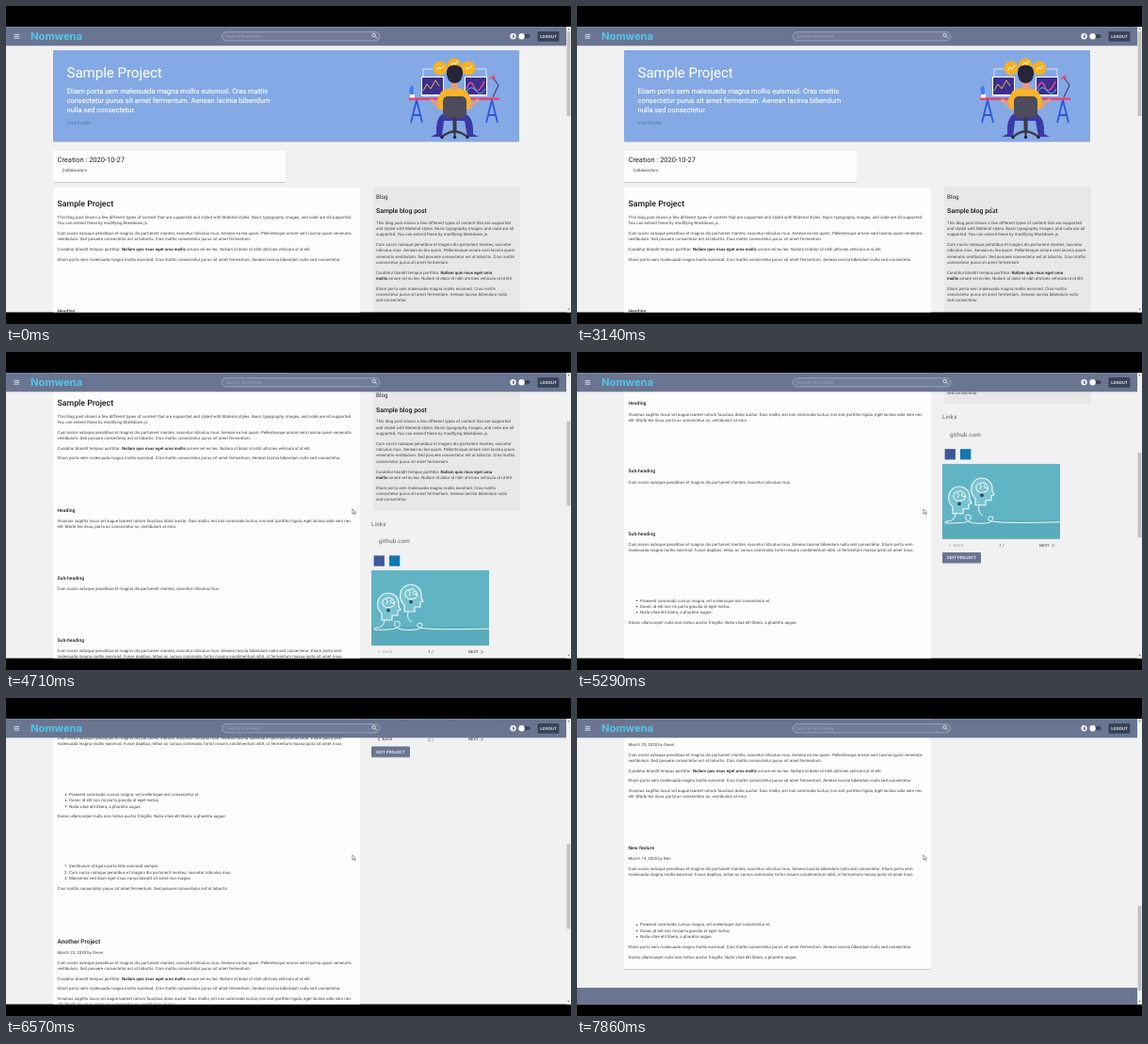
Recreate the animation shown at these times as an HTML page. Size 600x338 px, loop 8000 ms.

```html
<!DOCTYPE html>
<html lang="en">
<head>
<meta charset="utf-8">
<title>Project page</title>
<style>
  html, body { margin: 0; width: 100%; height: 100%; overflow: hidden; background: #000; }
  svg { display: block; }
  text { font-family: Roboto, sans-serif; text-rendering: geometricPrecision; white-space: pre; }
  .body { font-size: 4.375px; letter-spacing: .01071em; fill: #404040; }
  .body tspan { font-weight: 500; fill: #181818; }
  .sub { font-size: 5px; font-weight: 500; letter-spacing: .00938em; fill: #202020; }
  .h1 { font-size: 15px; fill: #fff; }
  .lead { font-size: 7.5px; fill: #fff; stroke: #fff; stroke-width: .12px; }
  .h2 { font-size: 8.75px; font-weight: 500; fill: #181818; }
  .h3 { font-size: 6.56px; font-weight: 500; fill: #202020; }
  .h4 { font-size: 6.9px; font-weight: 500; fill: #181818; }
  .h5 { font-size: 7.5px; fill: #222; }
  .h6 { font-size: 6.25px; letter-spacing: .0075em; fill: #2c2c2c; }
  .link { font-size: 6.25px; letter-spacing: .025em; fill: #606060; }
  .dim { font-size: 5px; fill: #60709b; }
  .hint { font-size: 5px; fill: #98a3ba; }
  .btn { font-size: 4.375px; font-weight: 500; letter-spacing: .02857em; fill: #fff; }
  .nav { font-size: 4.06px; font-weight: 500; letter-spacing: .02857em; fill: #555; }
  .logo { font: 700 11.2px Inter, sans-serif; fill: #55c4ea; }
  .mid { text-anchor: middle; }
</style>
</head>
<body>
<svg id="stage" width="600" height="338" viewBox="0 0 600 338"></svg>
<script>
const LOOP = 8000, FPS = 7;
const BAR = '#6a7591';

const SIZE = { body: 4.375, sub: 5, h1: 15, lead: 7.5, h2: 8.75, h3: 6.56, h4: 6.9, h5: 7.5,
  h6: 6.25, link: 6.25, dim: 5, hint: 5, btn: 4.375, nav: 4.06, logo: 11.2 };

// y is the middle of the line
const text = (x, y, str, kind = 'body', extra = '') =>
  `<text x="${x}" y="${y + SIZE[kind] * .35}" class="${kind} ${extra}">${str}</text>`;
const lines = (x, y, list, kind = 'body', step = 6.25) =>
  list.map((s, i) => text(x, y + i * step, s, kind)).join('');
const rect = (x, y, w, h, fill, r = 0, more = '') =>
  `<rect x="${x}" y="${y}" width="${w}" height="${h}" fill="${fill}" rx="${r}" ${more}/>`;
const disc = (x, y, r, fill, more = '') => `<circle cx="${x}" cy="${y}" r="${r}" fill="${fill}" ${more}/>`;
const shape = (d, fill, more = '') => `<path d="${d}" fill="${fill}" ${more}/>`;
const line = (d, color, w = 1, more = '') =>
  `<path d="${d}" fill="none" stroke="${color}" stroke-width="${w}" ${more}/>`;
const place = (x, y, a, body) => `<g transform="translate(${x} ${y}) rotate(${a})">${body}</g>`;
const SHADOW = 'filter="url(#shadow)"';

const strong = s => `<tspan>${s}</tspan>`;
const cum = 'Cum sociis natoque penatibus et magnis dis parturient montes, nascetur ridiculus mus.';
const etiam = 'Etiam porta sem malesuada magna mollis euismod. Cras mattis consectetur purus sit amet fermentum. Aenean lacinia bibendum nulla sed consectetur.';
const cumLong = [cum + ' Aenean eu leo quam. Pellentesque ornare sem lacinia quam venenatis',
  'vestibulum. Sed posuere consectetur est at lobortis. Cras mattis consectetur purus sit amet fermentum.'];
const cumFusce = [cum + ' Aenean lacinia bibendum nulla sed consectetur. Etiam porta sem',
  'malesuada magna mollis euismod. Fusce dapibus, tellus ac cursus commodo, tortor mauris condimentum nibh, ut fermentum massa justo sit amet risus.'];
const curabitur = `Curabitur blandit tempus porttitor. ${strong('Nullam quis risus eget urna mollis')} ornare vel eu leo. Nullam id dolor id nibh ultricies vehicula ut id elit.`;
const vivamus = ['Vivamus sagittis lacus vel augue laoreet rutrum faucibus dolor auctor. Duis mollis, est non commodo luctus, nisi erat porttitor ligula, eget lacinia odio sem nec',
  'elit. Morbi leo risus, porta ac consectetur ac, vestibulum at eros.'];
const donec = 'Donec ullamcorper nulla non metus auctor fringilla. Nulla vitae elit libero, a pharetra augue.';
const bullets = ['Praesent commodo cursus magna, vel scelerisque nisl consectetur et.',
  'Donec id elit non mi porta gravida at eget metus.', 'Nulla vitae elit libero, a pharetra augue.'];
const numbered = ['Vestibulum id ligula porta felis euismod semper.', cum,
  'Maecenas sed diam eget risus varius blandit sit amet non magna.'];

const list = (y, items, ordered) => lines(67, y, items) + items.map((_, i) => ordered
  ? text(62, y + i * 6.25, i + 1 + '.') : disc(63.6, y + i * 6.25 + .3, .75, '#333')).join('');

function worker() {
  const screen = x => rect(x, 75, 24, 21, '#fff', 1.2) + rect(x + 1, 76, 22, 18, '#3b2f8f', .6);
  const leg = x => line(`M${x} 100L${x - 6} 124M${x} 100L${x + 6} 124M${x - 4} 116H${x + 4}`, '#2f55d8', 1.8);
  return [461, 476, 491].map((x, i) => disc(x, i == 1 ? 63 : 66, 7.5, '#f7b226') +
      line(`M${x - 3} ${i == 1 ? 63 : 68}l2-3l2 2l3-4`, '#fff', 1)).join('') +
    line('M443 75V67H453M510 75V67H499', '#f2f5ff', .8) +
    screen(441) + screen(487) +
    line('M443 90l4-7l4 5l5-9l4 6', '#f0b83a', 1) + line('M489 88q4-12 8-2t11-6', '#ef4d8d', 1.4) +
    line('M489 91q5-8 10-1t10-2', '#43c6ff', 1) +
    line('M517 97l6-13l-6-8', '#33407a', 1.1) + shape('M513 78l5-5l2 4z', '#e8486b') +
    shape('M431 97q-5-8 0-13q4 6 0 13z', '#3f7df0') + rect(429, 94, 5, 4, '#fff') +
    rect(428, 97.5, 96, 2.6, '#e5446d', .6) + leg(436) + leg(516) +
    shape('M463 115q-7 5-6 21l-6 3h12l2-17h22l3 17h12l-6-3q1-16-7-21z', '#3a38a5') +
    shape('M463 90q12-6 26 0q6 8 6 18l-7 3l-1 6h-22l-1-6l-7-3q0-10 6-18z', '#f9b429') +
    line('M459 106l-7-6M493 106l8-6', '#e99b78', 3, 'stroke-linecap="round"') +
    rect(473, 80, 7, 9, '#e99b78', 2) + disc(476.5, 74, 8, '#272439') +
    shape('M468 74q-1-12 9-11q9 0 8 11z', '#272439') +
    rect(464, 96, 25, 23, '#4d4b5c', 5) + rect(474.5, 118, 4, 15, '#3b394a') +
    line('M463 139q13-11 27 0M476.5 130v9', '#3b394a', 2.2) +
    [463, 476.5, 490].map(x => disc(x, 139.5, 1.7, '#272439')).join('');
}

// slides are drawn in a 125 x 80 box
function ideaSlide() {
  const head = (x, y) => place(x, y, 0,
    shape('M-7 17V10Q-14 3-10-6Q-5-14 4-11Q12-8 11 2L13 6L10 7V12H4V17z', '#78c3d1',
      'stroke="#f4fbfc" stroke-width="1.1"') +
    line('M-6 0q-1-6 4-6q5-3 8 3q2 5-3 6q-7 2-9-3M-2-5q3 2 0 5M3-5q-2 4 3 4', '#fff', 1) +
    disc(0, 6.5, 1.9, '#274f63'));
  return rect(0, 0, 125, 80, '#61b4c4') + rect(0, 60, 125, 20, '#5aabbb') +
    head(18, 36) + head(42, 27) +
    line('M14 52q-1 10-9 9q-8 3 10 2q18 0 15-8q-7-3-5 4q4 6 22 4q6 0 7-6q-6-3-5 3q4 4 76 2M39 44q-2 8 4 11', '#eefafb', 1);
}
function deskSlide() {
  const laptop = (x, y, a, screen) => place(x, y, a,
    shape('M-15-14H15L18 2H-18z', '#e9edf0') + shape('M-13.5-12.5H13.5L16 1H-16z', screen) +
    shape('M-18 2H18L20 16H-20z', '#f0f2f4') + shape('M-15 4H15L16 10H-16z', '#56636f') +
    rect(-4, 11.5, 8, 3, '#cdd4d9'));
  const arm = (x, y, a, sleeve) => place(x, y, a,
    line('M0-9V-3', '#8b5a42', 4, 'stroke-linecap="round"') + line('M0-2V16', sleeve, 5) +
    line('M0-2V16', '#fff', 5, 'stroke-dasharray="1 2.5"'));
  const paper = (x, y, a, color) => place(x, y, a,
    rect(-7, -9, 14, 18, color, .5) + rect(-4.5, -6, 9, 8, '#fff') + line('M-3-3.5h6M-3-1h6', color, .8));
  const mug = (x, y) => disc(x, y, 4.8, '#fff') + disc(x, y, 3.6, '#4b3027');
  return rect(0, 0, 125, 80, '#bcc5ca') +
    shape('M0 0H125V18Q70 34 0 22z', '#c7ced2') +
    paper(13, 11, 14, '#f4a733') + paper(22, 25, 16, '#e23b62') + paper(15, 30, -18, '#d93a7c') +
    laptop(45, 40, -14, '#35506b') + laptop(91, 43, 12, '#6f93ab') +
    mug(17, 55) + mug(69, 54) +
    arm(31, 66, 18, '#e8ac2e') + arm(63, 62, -24, '#4d9f63') +
    arm(82, 66, 16, '#e8ac2e') + arm(112, 66, -20, '#e27a35') +
    disc(111, 27, 4, 'none', 'stroke="#fff" stroke-width="1.8"') +
    disc(120, 35, 4, '#fff', 'stroke="#2c353d" stroke-width="1.4"') +
    line('M107 18l8-5', '#2c353d', 1.3) + line('M62 20l12-3', '#fff', 1.6);
}

function hero() {
  return rect(50, 47, 495, 97, '#84a9e5', 1.2, SHADOW) + text(64.5, 71, 'Sample Project', 'h1') +
    lines(64.5, 90, ['Etiam porta sem malesuada magna mollis euismod. Cras mattis',
      'consectetur purus sit amet fermentum. Aenean lacinia bibendum', 'nulla sed consectetur.'], 'lead', 10) +
    text(64.5, 124, 'Visit Profile', 'dim') + worker() +
    rect(50, 154, 247, 33, '#fdfdfd', 1, SHADOW) +
    text(54.5, 163.5, 'Creation : 2020-10-27', 'h5') + text(59.5, 174.5, 'Collaborators');
}

function article() {
  const x = 54.5;
  return rect(50, 193, 326, 747, '#fdfdfd', 1, SHADOW) +
    text(x, 210, 'Sample Project', 'h2') +
    lines(x, 224.5, ['This blog post shows a few different types of content that are supported and styled with Material styles. Basic typography, images, and code are all supported.',
      'You can extend these by modifying Markdown.js.']) +
    lines(x, 241.3, cumLong) + text(x, 258.3, curabitur) + text(x, 269, etiam) +
    text(x, 324.2, 'Heading', 'sub') + lines(x, 335.7, vivamus) +
    text(x, 396.2, 'Sub-heading', 'sub') + text(x, 408, cum) +
    text(x, 462.4, 'Sub-heading', 'sub') + lines(x, 473.8, cumFusce) +
    list(533.6, bullets) + text(x, 556.6, donec) +
    list(610, numbered, true) +
    text(x, 633.2, 'Cras mattis consectetur purus sit amet fermentum. Sed posuere consectetur est at lobortis.') +
    text(x, 689.5, 'Another Project', 'h3') + text(x, 702, 'March 23, 2020 by Owen') +
    lines(x, 712.5, cumLong) + text(x, 729.2, curabitur) + text(x, 739.8, etiam) + lines(x, 750.5, vivamus) +
    text(x, 811.5, 'New feature', 'sub') + text(x, 823, 'March 14, 2020 by Ben') +
    lines(x, 833.5, cumFusce) + list(893, bullets) + text(x, 916.5, etiam) + text(x, 927.2, donec);
}

function sidebar() {
  const x = 393;
  return rect(390, 191.5, 156, 133.5, '#e8e8e8', 1.2) +
    text(x, 202.5, 'Blog', 'h6') + text(x, 217.5, 'Sample blog post', 'h4') +
    lines(x, 230, ['This blog post shows a few different types of content that are supported',
      'and styled with Material styles. Basic typography, images, and code are all',
      'supported. You can extend these by modifying Markdown.js.']) +
    lines(x, 253.7, ['Cum sociis natoque penatibus et magnis dis parturient montes, nascetur',
      'ridiculus mus. Aenean eu leo quam. Pellentesque ornare sem lacinia quam',
      'venenatis vestibulum. Sed posuere consectetur est at lobortis. Cras mattis',
      'consectetur purus sit amet fermentum.']) +
    lines(x, 283.3, ['Curabitur blandit tempus porttitor. ' + strong('Nullam quis risus eget urna'),
      strong('mollis') + ' ornare vel eu leo. Nullam id dolor id nibh ultricies vehicula ut id elit.']) +
    lines(x, 300.3, ['Etiam porta sem malesuada magna mollis euismod. Cras mattis',
      'consectetur purus sit amet fermentum. Aenean lacinia bibendum nulla', 'sed consectetur.']) +
    text(388, 338.7, 'Links', 'link') + text(396, 357.5, 'github.com', 'link') +
    rect(390.6, 372.6, 11.3, 11.3, '#3b5998') + rect(407, 372.6, 11.3, 11.3, '#1278b2') +
    `<svg x="388" y="388.3" width="125" height="80" viewBox="0 0 125 80"><g id="slides">${ideaSlide()}
      <g transform="translate(125)">${deskSlide()}</g></g></svg>` +
    `<g id="back">${text(399.5, 475.1, 'BACK', 'nav')}${line('M396.8 473.4l-1.7 1.7l1.7 1.7', '#444', .7)}</g>` +
    text(448.3, 475.1, '<tspan id="page" style="font-weight:400;fill:#404040">1</tspan> /') +
    text(491, 475.1, 'NEXT', 'nav') + line('M504.6 473.4l1.7 1.7l-1.7 1.7', '#444', .7) +
    rect(388, 482.6, 41, 11.3, BAR, 1, SHADOW) + text(408.5, 488.3, 'EDIT PROJECT', 'btn', 'mid');
}

function header() {
  return rect(0, 22, 595, 20, BAR, 0, SHADOW) +
    line('M8.5 30.4h5.6M8.5 32.3h5.6M8.5 34.2h5.6', '#fff', .7) +
    text(26, 31.9, 'Nomwena', 'logo') +
    rect(229.3, 27.7, 167.6, 9.2, '#707c98', 4.6, 'stroke="#c9cfdb" stroke-width=".5"') +
    text(233, 32.4, 'Search Nomwena', 'hint') +
    disc(390.6, 31, 1.7, 'none', 'stroke="#fff" stroke-width=".7"') + line('M391.9 32.3l2 2', '#fff', .8) +
    disc(538.5, 32.2, 3.1, '#fff') + shape('M538 30.2a2 2 0 0 1 0 4z', BAR) +
    rect(546, 30.1, 10.5, 4.2, '#3c465c', 2.1) + disc(547.6, 32.2, 3.2, '#fff') +
    rect(564.5, 27, 22.8, 10.8, '#38435a', 1) + text(576, 32.3, 'LOGOUT', 'btn', 'mid');
}

function scrollbar() {
  return rect(595, 22, 5, 304, '#f1f1f1') +
    shape('M596.2 25.3h2.6l-1.3-1.6z', '#666') + shape('M596.2 321.7h2.6l-1.3 1.6z', '#666') +
    rect(595.6, 27, 3.8, 90, '#c1c1c1', 0, 'id="thumb"');
}

const stage = document.getElementById('stage');
stage.innerHTML = `<defs>
    <filter id="shadow" x="-10%" y="-10%" width="120%" height="130%">
      <feDropShadow dx="0" dy=".6" stdDeviation=".7" flood-opacity=".25"/></filter>
    <clipPath id="view"><path d="M0 22.3H600V325.6H0z"/></clipPath></defs>` +
  rect(0, 0, 600, 338, '#000') +
  `<g clip-path="url(#view)">${rect(0, 22, 600, 304, '#f1f1f2')}
    <g id="doc">${hero()}${article()}${sidebar()}${rect(0, 960, 595, 60, BAR)}</g>
    ${header()}${scrollbar()}</g>` +
  `<g id="arrow">${shape('M0 0V5.2L1.2 4.1L2.1 6L2.9 5.6L2.1 3.8H3.7z', '#fff', 'stroke="#444" stroke-width=".5"')}</g>` +
  `<g id="beam">${line('M-1.1-3h2.2M0-3V3M-1.1 3h2.2', '#222', .6)}</g>`;

const el = id => document.getElementById(id);
const [doc, thumb, slides, page, back, arrow, beam] =
  ['doc', 'thumb', 'slides', 'page', 'back', 'arrow', 'beam'].map(el);

const clamp = u => Math.max(0, Math.min(1, u));
const smooth = u => u * u * (3 - 2 * u);

// wheel bursts of five ticks each
const BURSTS = [3957, 4860, 6129, 6870, 7685], BURST_MS = 650, BURST_PX = 156.25;
const scrollAt = t => BURSTS.reduce((s, b) => s + BURST_PX * smooth(clamp((t - b) / BURST_MS)), 0);

const SWIPE = 5495, SWIPE_MS = 350;

// time, x, y
const POINTER = [[140, 574, 34], [1140, 79, 126], [1500, 79, 126], [2000, 81.5, 168.5], [2290, 81.5, 168.5],
  [2860, 440, 214], [3140, 440, 214], [3710, 367.8, 166.8], [8000, 367.8, 166.8]];
function pointerAt(t) {
  const i = Math.max(1, POINTER.findIndex(p => p[0] >= t));
  const [a, b] = [POINTER[i - 1], POINTER[i]];
  const u = smooth(clamp((t - a[0]) / (b[0] - a[0])));
  return [a[1] + (b[1] - a[1]) * u, a[2] + (b[2] - a[2]) * u];
}

function draw(t) {
  const s = scrollAt(t);
  doc.setAttribute('transform', `translate(0 ${-s})`);
  thumb.setAttribute('y', 27 + s * .2975);

  const swipe = 1 - (1 - clamp((t - SWIPE) / SWIPE_MS)) ** 3;
  slides.setAttribute('transform', `translate(${-125 * swipe})`);
  page.textContent = t < SWIPE ? 1 : 2;
  back.setAttribute('opacity', t < SWIPE ? .4 : 1);

  const [x, y] = pointerAt(t);
  const onText = t > 1200 && t < 2400;
  for (const c of [arrow, beam]) c.setAttribute('transform', `translate(${x} ${y})`);
  arrow.style.display = t >= 140 && !onText ? '' : 'none';
  beam.style.display = onText ? '' : 'none';
}

const start = performance.now();
function tick() {
  const t = (performance.now() - start) % LOOP;
  draw(Math.floor(t * FPS / 1000 + .07) * 1000 / FPS);
  requestAnimationFrame(tick);
}
tick();
</script>
</body>
</html>
```
